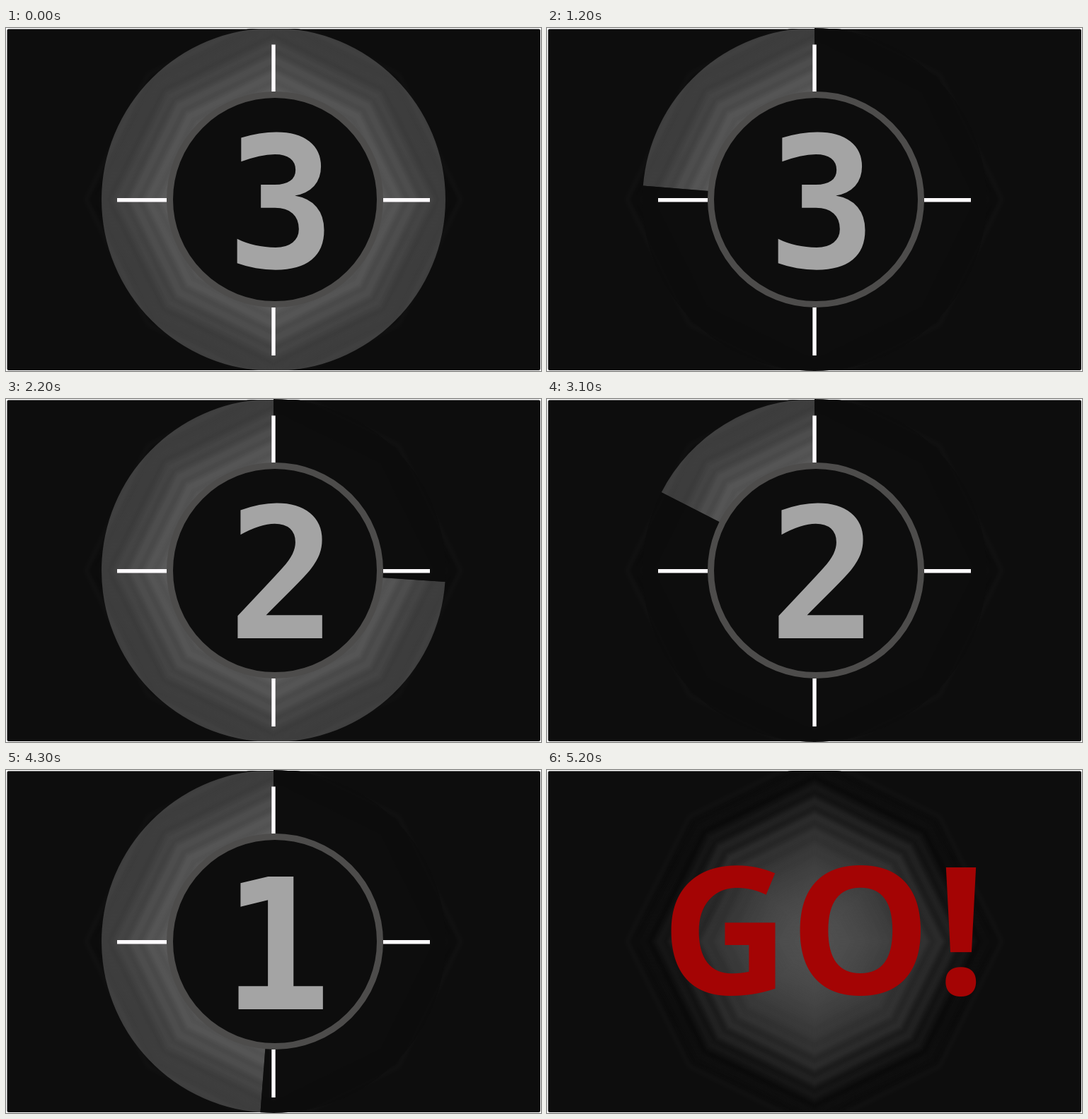
These frames come from a looping animation (756x486 px, 5.4 s). An HTML page with a canvas:

```html
<!DOCTYPE html>
<html lang="en">
<head>
<meta charset="utf-8">
<title>Countdown</title>
<style>
  html, body { margin: 0; width: 100%; height: 100%; overflow: hidden; background: #fff; }
  canvas { display: block; }
</style>
</head>
<body>
<canvas id="stage" width="756" height="486"></canvas>
<script>
const W = 756, H = 486, CX = 378, CY = 243, R = 243;
const STEP = 100, LOOP = 5400, GO_STEP = 52;
const STARTS = { 1: 35, 2: 18, 3: 0 }; // first step of each digit
const DARK = '#0d0d0d';
const ctx = document.getElementById('stage').getContext('2d');

// Octagon with slightly pulled-in diagonal corners.
function octagon(c, radius) {
  c.beginPath();
  for (let i = 0; i < 8; i++) {
    const a = i * Math.PI / 4, r = radius * (i % 2 ? 0.945 : 1);
    c.lineTo(CX + r * Math.cos(a), CY + r * Math.sin(a));
  }
  c.closePath();
}

// Brightness falls off from the centre, with ripples near the rim.
function glowLevel(r) {
  const base = 13 + 67 * Math.max(0, 1 - (r / 232) ** 1.8);
  const ripple = 5 * Math.exp(-(((r - 190) / 45) ** 2));
  return base + ripple * Math.cos(2 * Math.PI * (r - 222) / 22);
}

function makeBackdrop() {
  const canvas = document.createElement('canvas');
  canvas.width = W;
  canvas.height = H;
  const c = canvas.getContext('2d');
  c.beginPath();
  c.roundRect(1.5, 1.5, W - 2.5, H - 2.5, 2);
  c.fillStyle = DARK;
  c.fill();
  c.clip();

  for (let r = 260; r > 0; r--) {
    const v = glowLevel(r);
    c.fillStyle = `rgb(${v} ${v} ${v})`;
    octagon(c, r);
    c.fill();
  }
  c.filter = 'blur(3px)';
  c.lineWidth = 6;
  c.strokeStyle = 'rgba(255,255,255,0.025)';
  octagon(c, 265);
  c.stroke();
  return canvas;
}

function pie(from, to, color) {
  const rad = deg => (deg - 90) * Math.PI / 180;
  ctx.fillStyle = color;
  ctx.beginPath();
  ctx.moveTo(CX, CY);
  ctx.arc(CX, CY, R, rad(from), rad(to));
  ctx.fill();
}

// Centres the ink of a glyph on x.
function glyph(text, x, baseline) {
  const m = ctx.measureText(text);
  ctx.fillText(text, x - (m.actualBoundingBoxRight - m.actualBoundingBoxLeft) / 2, baseline);
}

function drawCount(digit, n) {
  const wiped = n ? Math.min(360, 22.5 * n + 5 - 5 / n) : 0;
  if (wiped < 360) pie(wiped, 360, 'rgba(255,255,255,0.2)');
  if (wiped > 0) pie(0, wiped, 'rgba(13,13,13,0.97)');

  ctx.fillStyle = DARK;
  ctx.strokeStyle = '#4d4c4b';
  ctx.lineWidth = 9;
  ctx.beginPath();
  ctx.arc(380, CY, 148.5, 0, 2 * Math.PI);
  ctx.fill();
  ctx.stroke();

  ctx.fillStyle = '#fdfafd';
  ctx.fillRect(157, 241, 70, 5.5);
  ctx.fillRect(533, 241, 66, 5.5);
  ctx.fillRect(375.3, 23.5, 5.4, 66.5);
  ctx.fillRect(375.3, 396, 5.4, 68);

  ctx.font = 'bold 258px "DejaVu Sans Mono", monospace';
  ctx.fillStyle = '#a4a4a4';
  glyph(digit, 387.5, 339);
}

function drawGo() {
  ctx.font = '740 250.7px "Open Sans", sans-serif';
  ctx.fillStyle = '#a40404';
  glyph('G', 249, 317.5);
  glyph('O', 442.5, 317.5);
  glyph('!', 585, 317.5);
}

const backdrop = makeBackdrop();

function frame() {
  const step = Math.floor(performance.now() % LOOP / STEP);
  ctx.clearRect(0, 0, W, H);
  ctx.drawImage(backdrop, 0, 0);
  if (step >= GO_STEP) {
    drawGo();
  } else {
    const digit = Object.keys(STARTS).find(d => step >= STARTS[d]);
    drawCount(digit, step - STARTS[digit]);
  }
  requestAnimationFrame(frame);
}
frame();
</script>
</body>
</html>
```
